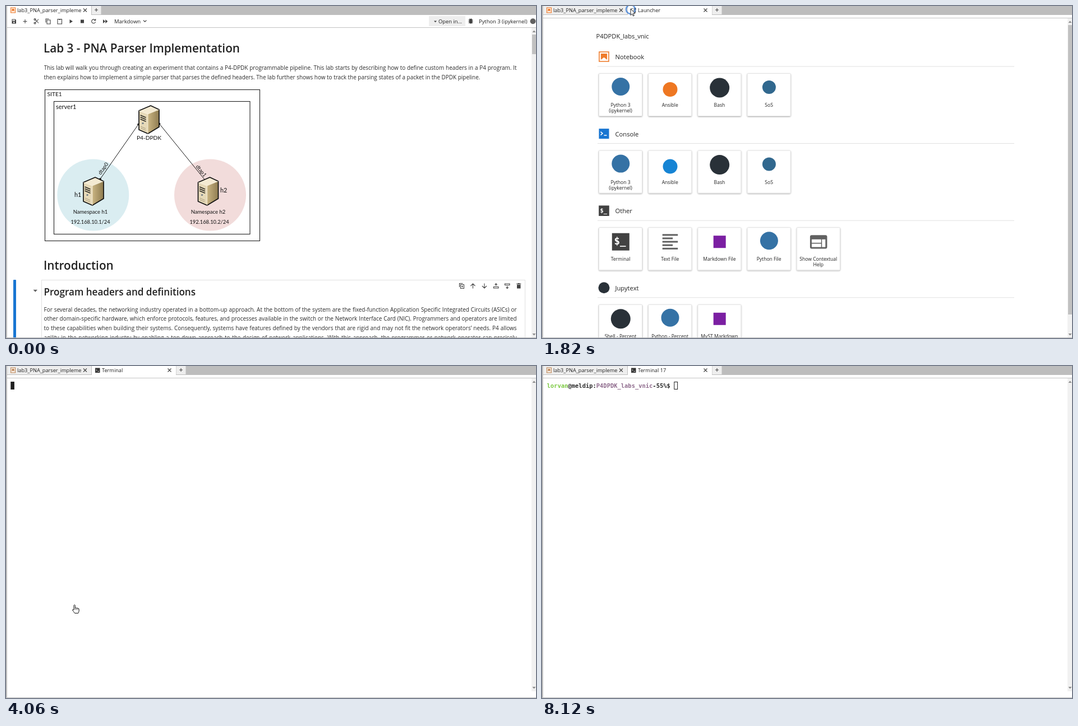
Write an HTML page that moves like this. It is 945 px wide and 593 px high and loops after 8200 ms.

```html
<!DOCTYPE html>
<html lang="en">
<head>
<meta charset="utf-8">
<title>Opening a terminal from a notebook</title>
<style>
html, body { margin: 0; width: 100%; height: 100%; overflow: hidden; background: #fff; }
svg { display: block; width: 945px; height: 593px; font-family: "Open Sans", "Noto Sans", sans-serif; fill: #212121; }
.icon { fill: none; stroke: #424242; stroke-width: 1.1; }
.diagram { font-family: Lato, sans-serif; fill: #111; }
.mono { font-family: "DejaVu Sans Mono", monospace; font-weight: bold; }
.prose { width: 843px; font-size: 9.95px; line-height: 16.8px; color: #2b2b2b; white-space: nowrap; }
.prose div { text-align: justify; text-align-last: justify; }
.prose .end { text-align-last: left; }
</style>
</head>
<body>
<svg id="stage" viewBox="0 0 945 593" xmlns="http://www.w3.org/2000/svg"></svg>
<script>
const LOOP = 8200, STEP = 140;
const stage = document.getElementById('stage');

const rect = (x, y, w, h, fill, more = '') =>
  `<rect x="${x}" y="${y}" width="${w}" height="${h}" fill="${fill}" ${more}/>`;
const circle = (x, y, r, fill) => `<circle cx="${x}" cy="${y}" r="${r}" fill="${fill}"/>`;
const path = (d, more = 'class="icon"') => `<path d="${d}" ${more}/>`;
const solid = (d, fill = '#424242') => path(d, `fill="${fill}"`);
const text = (x, y, size, s, more = '') => `<text x="${x}" y="${y}" font-size="${size}" ${more}>${s}</text>`;
const group = (id, body) => `<g id="${id}">${body}</g>`;
const at = (x, y, body) => `<g transform="translate(${x} ${y})">${body}</g>`;

const cross = x => path(`M${x - 3} 4.5l6 6m0-6l-6 6`);
const plus = (x, y, r = 3) => path(`M${x - r} ${y}h${2 * r}M${x} ${y - r}v${2 * r}`);

function scrollbar(top, bottom, thumbTop, thumbHeight) {
  return rect(937, top, 8, bottom - top, '#f1f1f1') +
    (thumbHeight ? rect(938, thumbTop, 7, thumbHeight, '#c1c1c1') : '') +
    solid(`M938.5 ${top + 8}l3-3.5 3 3.5z`, '#8a8a8a') +
    solid(`M938.5 ${bottom - 8}l3 3.5 3-3.5z`, '#8a8a8a');
}

function notebookTab(background, ink) {
  return rect(2, 0, 150, 16, background) +
    rect(8.6, 3.1, 8, 8.8, '#fff', `stroke="${ink}" stroke-width="1.2"`) +
    solid('M10.4 5h4.4v5.2l-2.2-1.9-2.2 1.9z', ink) +
    text(20, 11, 9.2, 'lab3_PNA_parser_impleme') + cross(141) +
    rect(152, 0, 1, 16, '#bdbdbd');
}

function secondTabs(icon, title, notebookInk) {
  return rect(0, 0, 945, 16, '#bdbdbd') + notebookTab('#eee', notebookInk) +
    rect(153, 0, 150, 16, '#fff') + icon + title + cross(291.5) +
    rect(303.5, 0, 17, 15, '#eee') + plus(312, 7) +
    rect(2, 15, 151, 1, '#bdbdbd') + rect(2, 21, 943, 1, '#c4c4c4');
}

function toolbar() {
  return solid('M10.5 23.5h6l1.5 1.5v6.5h-7.5z') + rect(11.5, 24.5, 4.5, 2, '#fff') +
    circle(14.2, 29.3, 1.2, '#fff') + plus(34, 27.5, 3.4) +
    path('M51.5 23.5l6.5 7M58 23.5l-6.5 7') +
    path('M50 24a1.5 1.5 0 1 0 3 0a1.5 1.5 0 1 0-3 0M50 30.5a1.5 1.5 0 1 0 3 0a1.5 1.5 0 1 0-3 0') +
    path('M71 29.5v-6.5h5.5M73 25h6v7h-6z') +
    path('M92 23.5h7.5v8.5h-7.5zM94 24.2h3.5') +
    solid('M113.5 24l5.5 3.5-5.5 3.5z') + rect(133, 24.5, 6, 6, '#424242') +
    path('M159 25.3a3.5 3.5 0 1 0 .6 3M159.7 23v2.8h-2.8') +
    solid('M173 24l4 3.5-4 3.5zM177.3 24l4 3.5-4 3.5z') +
    text(193, 31, 9.5, 'Markdown') + path('M245 25.5l2.7 2.7 2.7-2.7') +
    rect(754, 18, 65, 18, '#eee') + solid('M763 26.5h5l-2.5 2.8z') + text(771, 31.3, 9.4, 'Open in...') +
    solid('M826 25.5a2.7 2.7 0 0 1 5.4 0v3.3a2.7 2.7 0 0 1-5.4 0z') +
    path('M824.5 25h8M824.5 27.5h8M824.5 30h8M826.5 22.5l1 1.5m3-1.5l-1 1.5') +
    text(843, 31, 9.4, 'Python 3 (ipykernel)') + circle(939.5, 27.3, 5, '#616161') +
    rect(2, 38, 943, 1, '#c2c2c2');
}

function server(x, y) {
  const slots = [17, 20.5, 24].map(v => `M2.5 ${v}l10 4.3`).join('');
  return at(x, y,
    solid('M0 9L21 0 36 7 16 15z', '#f4ead2') +
    solid('M0 9L16 15V50L0 43z', '#e6d9b8') +
    solid('M16 15L36 7V38L16 50z', 'url(#side)') +
    path(slots, 'stroke="#2b2923" stroke-width="1.5" fill="none"') +
    circle(7, 31.5, 1.6, '#6c7884') + path('M3 37l9 4M3 40l9 4', 'stroke="#a89b7c" fill="none"') +
    path('M0 9L21 0 36 7V38L16 50 0 43z', 'fill="none" stroke="#111" stroke-width="1.7" stroke-linejoin="round"') +
    path('M0 9L16 15 36 7M16 15V50', 'fill="none" stroke="#fff8e5" stroke-width=".7"'));
}

function diagram() {
  const frame = 'stroke="#222" stroke-width="1.1"';
  const mid = (x, y, size, s) => text(x, y, size, s, 'text-anchor="middle"');
  return `<g class="diagram">` +
    rect(69.5, 149.5, 383, 270, '#fff', frame) + rect(85.5, 170.5, 349.5, 237, '#fff', frame) +
    circle(155.3, 337.5, 64, '#daedf1') + circle(364, 337.5, 64, '#f2dcdb') +
    path('M236 211.5L168 309M273.5 210.5L355 311', 'stroke="#111" fill="none"') +
    [[236, 211.5], [168, 309], [273.5, 210.5], [355, 311]].map(p => circle(...p, 1.8, '#111')).join('') +
    server(237, 178) + server(138, 306) + server(342.5, 306) +
    text(73.5, 161, 10.2, 'SITE1') + text(89, 184, 11, 'server1') +
    mid(255, 239, 10.2, 'P4-DPDK') + text(122, 341, 10.8, 'h1') + text(382, 333, 10.8, 'h2') +
    mid(150.5, 370.5, 9.5, 'Namespace h1') + mid(360.5, 370.5, 9.5, 'Namespace h2') +
    mid(150.5, 389, 9.3, '192.168.10.1/24') + mid(362.5, 389, 9.3, '192.168.10.2/24') +
    text(0, 0, 9.4, 'dtap0', 'transform="translate(169 302) rotate(-55)"') +
    text(0, 0, 9.4, 'dtap1', 'transform="translate(338 287) rotate(51)"') + '</g>';
}

function prose(y, lines, lastIsEnd) {
  const rows = lines.map((s, i) => `<div class="${lastIsEnd && i === lines.length - 1 ? 'end' : ''}">${s}</div>`);
  return `<foreignObject x="67.5" y="${y}" width="855" height="${Math.min(593 - y, lines.length * 17)}">` +
    `<div xmlns="http://www.w3.org/1999/xhtml" class="prose">${rows.join('')}</div></foreignObject>`;
}

function cellTools() {
  return path('M808.5 502v-6.5h6M810.5 497.5h6v7h-6zM812 501h3M813.5 499.5v3') +
    path('M832.5 504.5v-8.5M828.5 500l4-4 4 4M853 495.5v8.5M849 500l4 4 4-4') +
    path('M869.5 501.5h8.5v2.5h-8.5zM873.7 500v-4M871.7 497.8l2-2 2 2') +
    path('M889.5 496h8.5v2.5h-8.5zM893.7 500v4.5M891.7 502.5l2 2 2-2') +
    solid('M911 497.7h6.5v6.8h-6.5zM910.3 495.8h2.2l.7-.8h2.2l.7.8h2.2v1.2h-8z');
}

function notebookScene() {
  const heading = 'font-weight="600"';
  return rect(0, 0, 945, 593, '#fff') + rect(0, 0, 945, 16, '#bdbdbd') + notebookTab('#fff', '#ef7d2d') +
    rect(153, 0, 16.5, 15, '#eee') + plus(161, 7) + rect(2, 16, 943, 1, '#fff') +
    toolbar() + scrollbar(39, 593, 51, 35) +
    text(67, 82.5, 20.7, 'Lab 3 - PNA Parser Implementation', heading) +
    prose(102.4, [
      'This lab will walk you through creating an experiment that contains a P4-DPDK programmable pipeline. This lab starts by describing how to define custom headers in a P4 program. It',
      'then explains how to implement a simple parser that parses the defined headers. The lab further shows how to track the parsing states of a packet in the DPDK pipeline.'
    ], true) +
    diagram() + text(67, 470.5, 20.7, 'Introduction', heading) +
    rect(13, 489, 5, 104, '#1976d2', 'rx="1"') +
    rect(63.5, 489.5, 862, 110, '#fff', 'stroke="#e0e0e0"') +
    solid('M48.5 506.8h7.5l-3.7 4z', '#616161') + cellTools() +
    text(67.5, 517, 17.1, 'Program headers and definitions', heading) +
    prose(533.6, [
      'For several decades, the networking industry operated in a bottom-up approach. At the bottom of the system are the fixed-function Application Specific Integrated Circuits (ASICs) or',
      'other domain-specific hardware, which enforce protocols, features, and processes available in the switch or the Network Interface Card (NIC). Programmers and operators are limited',
      'to these capabilities when building their systems. Consequently, systems have features defined by the vendors that are rigid and may not fit the network operators’ needs. P4 allows',
      'agility in the networking industry by enabling a top-down approach to the design of network applications. With this approach, the programmer or network operator can precisely'
    ], false);
}

// Launcher glyphs are drawn around the middle of a card's icon area.
const prompt = (half, size, mark) => rect(-half, -half, 2 * half, 2 * half, '#424242') +
  text(-half * .76, size * .27, size, mark, 'class="mono" style="fill:#fff"');
const glyphs = {
  python: circle(0, -2, 16, '#3572a5'),
  ansibleNotebook: circle(0, 3, 13, '#ee7722'),
  ansibleConsole: circle(0, 3, 13, '#1684d4'),
  bash: circle(0, 0, 17.5, '#293138'),
  sos: circle(0, -1, 12, '#31688e'),
  markdown: rect(-11, -11, 22, 22, '#7b1fa2'),
  terminal: prompt(15.5, 17.5, '$_'),
  textFile: [27.5, 18.4, 27.5, 18.4, 27.5].map((w, i) => rect(-13.8, -13.8 + i * 6.1, w, 3, '#616161')).join(''),
  help: rect(-15.2, -12, 30.5, 24.4, '#616161', 'rx="3"') +
    rect(-12.2, -4.4, 16.8, 6.1, '#fff') + rect(-12.2, 3.3, 16.8, 6.1, '#fff') + rect(6.1, -4.4, 6.1, 13.8, '#fff')
};

const sections = [
  ['Notebook', [['python', 'Python 3|(ipykernel)'], ['ansibleNotebook', 'Ansible'], ['bash', 'Bash'], ['sos', 'SoS']]],
  ['Console', [['python', 'Python 3|(ipykernel)'], ['ansibleConsole', 'Ansible'], ['bash', 'Bash'], ['sos', 'SoS']]],
  ['Other', [['terminal', 'Terminal'], ['textFile', 'Text File'], ['markdown', 'Markdown File'],
    ['python', 'Python File'], ['help', 'Show Contextual|Help']]],
  ['Jupytext', [['bash', 'Shell - Percent'], ['python', 'Python - Percent'], ['markdown', 'MyST Markdown']]]
];
const sectionIcons = [
  rect(-8.5, -8.5, 17, 17, '#fff', 'stroke="#ef7d2d" stroke-width="1.6"') +
    solid('M-5.6 -5.6h11.2v11.2l-5.6-4.4-5.6 4.4z', '#ef7d2d'),
  rect(-9, -9, 18, 18, '#1976d2') + path('M-6 -3.5l3.5 3-3.5 3M0 3h5', 'fill="none" stroke="#fff" stroke-width="1.5"'),
  prompt(9.3, 10.5, '$_'),
  circle(0, 0, 10, '#293138')
];

function card(glyph, label, column) {
  const lines = label.split('|').map((s, i) => text(39, 60 + i * 10, 8.55, s, 'text-anchor="middle"')).join('');
  const id = glyph === 'terminal' ? 'id="terminalCard"' : '';
  return at(101 + column * 88.2, 0,
    rect(.5, .5, 77, 76, '#fff', `${id} rx="1.5" stroke="#e2e2e2" filter="url(#lift)"`) +
    at(39.3, 26, glyphs[glyph]) + lines);
}

function launcherScene() {
  const icon = path('M163.5 4.5h-4v7h7v-4M164 4h3v3M167 4l-4.5 4.5');
  const body = sections.map(([title, cards], row) => at(0, row * 137.6,
    at(110.5, 90.5, sectionIcons[row]) + text(130.5, 95, 11.2, title) +
    rect(99, 107.5, 743, 1, '#e0e0e0') +
    at(0, 120, cards.map(([glyph, label], i) => card(glyph, label, i)).join('')))).join('');
  return rect(0, 0, 945, 593, '#fff') + secondTabs(icon, text(171, 11, 9.2, 'Launcher'), '#ef7d2d') +
    text(96.5, 58, 11.1, 'P4DPDK_labs_vnic') + body + scrollbar(22, 593, 34, 517);
}

function terminalScene() {
  const icon = rect(159, 3.5, 8.5, 8.5, '#333') +
    path('M160.5 6l1.7 1.5-1.7 1.5M163.5 9.5h2.5', 'fill="none" stroke="#fff" stroke-width=".8"');
  const title = text(171, 11, 9.2, 'Terminal<tspan id="number"> 17</tspan>');
  const span = (s, fill) => `<tspan fill="${fill}">${s}</tspan>`;
  return rect(0, 0, 945, 593, '#fff') + secondTabs(icon, title, '#c08a5c') + scrollbar(22, 581) +
    text(8.8, 39, 10.45, span('lorvan', '#7bc940') + span('@meldip:', '#2e2e2e') +
      span('P4DPDK_labs_vnic', '#8f6b8d') + span('-55%$', '#2e2e2e'), 'id="promptLine" class="mono"') +
    rect(0, 28, 7, 14, '#1f1f1f', 'id="caret"');
}

const arrow = path('M0 0V11.5L2.7 9 4.5 13 6.3 12.2 4.6 8.3H8z', 'fill="#fff" stroke="#111" stroke-width=".9"');
const hand = path('M-1 1.5Q0 -.8 1.3 1.5V6.5Q2.5 5 3.5 6.5 5 5.3 6 7 8.2 6.5 8.2 8.5V11Q8 13 6.8 15.5H.5Q-1.5 12.5-3.5 10-3.3 8-1 9.5z',
  'fill="#fff" stroke="#111" stroke-width="1" stroke-linejoin="round"') +
  path('M1.3 6.5v3M3.6 6.7v3M6 7.2v2.5', 'stroke="#111" stroke-width=".7"');

const shadow = (id, dy, blur, opacity) =>
  `<filter id="${id}" x="-20%" y="-20%" width="140%" height="140%">` +
  `<feDropShadow dx="0" dy="${dy}" stdDeviation="${blur}" flood-opacity="${opacity}"/></filter>`;

stage.innerHTML = `<defs>
  <linearGradient id="side"><stop stop-color="#c9b482"/><stop offset="1" stop-color="#8f7c50"/></linearGradient>
  ${shadow('lift', 1, 1, .35)}${shadow('hover', 2.5, 3.5, .55)}</defs>` +
  group('notebook', notebookScene()) + group('launcher', launcherScene()) + group('terminal', terminalScene()) +
  rect(0, 0, 2, 593, '#bdbdbd') + rect(0, 592, 945, 1, '#bdbdbd') +
  `<circle id="ring" stroke="#1766d0" stroke-width="2.6" fill="#fff" fill-opacity=".5"/>` +
  group('pointer', group('arrow', arrow) + group('hand', hand));

const part = id => document.getElementById(id);
const show = (id, on) => part(id).setAttribute('display', on ? 'inline' : 'none');
const set = (id, values) => Object.entries(values).forEach(([k, v]) => part(id).setAttribute(k, v));

const moves = [[420, 330, 250], [1260, 158, 5], [1820, 158, 5], [2520, 122, 426], [LOOP, 122, 426]];
const clicks = [[1680, 158, 6], [2940, 122, 426]];
const blinkOff = [[4760, 5320], [5880, 6440], [7140, 7700]];

function pointerAt(t) {
  const i = Math.max(1, moves.findIndex(m => m[0] >= t));
  const [t0, x0, y0] = moves[i - 1], [t1, x1, y1] = moves[i];
  const p = Math.max(0, (t - t0) / (t1 - t0)), e = p * p * (3 - 2 * p);
  return [x0 + (x1 - x0) * e, y0 + (y1 - y0) * e];
}

function render(time) {
  const t = Math.floor(time / STEP) * STEP;
  show('notebook', t < 1820);
  show('launcher', t >= 1820 && t < 4060);
  show('terminal', t >= 4060);

  const [x, y] = pointerAt(t);
  const overCard = t >= 1820 && y > 395;
  show('pointer', t >= 420 && t < 4760);
  set('pointer', { transform: `translate(${x} ${y})`, opacity: t < 4480 ? 1 : (4760 - t) / 420 });
  show('arrow', !overCard);
  show('hand', overCard);
  set('terminalCard', { stroke: overCard ? '#1976d2' : '#e2e2e2', filter: `url(#${overCard ? 'hover' : 'lift'})` });

  const click = clicks.find(c => t >= c[0] && t < c[0] + 560);
  show('ring', click);
  if (click) {
    const age = (t - click[0]) / 560;
    set('ring', { cx: click[1], cy: click[2], r: 6.2 + age * 7, opacity: (1 - age) ** 1.6 });
  }

  const ready = t >= 6580, focused = t < 8120;
  show('number', t >= 4200);
  show('promptLine', ready);
  show('caret', !blinkOff.some(([a, b]) => t >= a && t < b));
  set('caret', focused
    ? { x: ready ? 235.3 : 8.3, y: 28, width: 6.6, height: 14, fill: '#1f1f1f', stroke: 'none' }
    : { x: 235.8, y: 28.5, width: 5.8, height: 13, fill: 'none', stroke: '#1f1f1f' });
}

function tick() {
  render(performance.now() % LOOP);
  requestAnimationFrame(tick);
}
tick();
</script>
</body>
</html>
```
